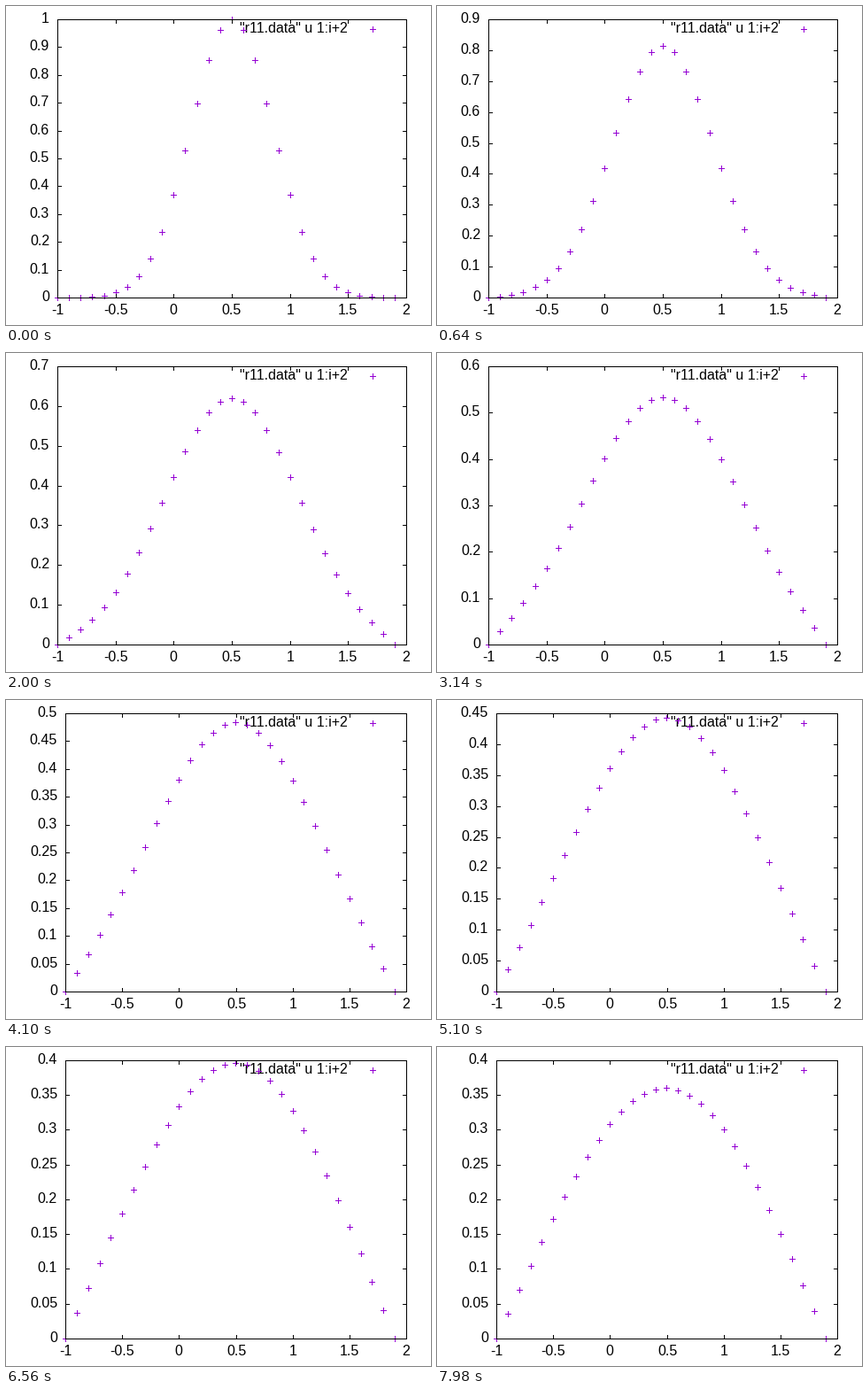
A matplotlib script for the animation above (8000 ms loop, 480 by 360 pixels).

```python
import math

import numpy as np
import matplotlib.pyplot as plt
from matplotlib.animation import FuncAnimation
from matplotlib.collections import PolyCollection

W, H, DPI = 480, 360, 100
FRAMES, INTERVAL = 400, 20
TOP, BOTTOM, RIGHT = 15, 329, 452
X_MIN, X_MAX = -1, 2
R = 0.1          # diffusion number of the explicit scheme
ARM, TICK = 3, 4
PURPLE = "#9400d3"

plt.rcParams["font.family"] = "Liberation Sans"
FONT_SIZE = 16 * 72 / DPI

x = np.linspace(-1, 1.9, 30)


def diffuse():
    """Heat equation with fixed ends, one row per time step."""
    u = np.exp(-4 * (x - 0.5) ** 2)
    rows = [u]
    for _ in range(FRAMES - 1):
        u = u.copy()
        u[1:-1] += R * (u[2:] - 2 * u[1:-1] + u[:-2])
        rows.append(u)
    return rows


history = diffuse()

fig = plt.figure(figsize=(W / DPI, H / DPI), dpi=DPI, facecolor="white")
ax = fig.add_axes([0, 0, 1, 1])
ax.set_xlim(0, W)
ax.set_ylim(H, 0)
ax.axis("off")


def box(x0, y0, x1, y1):
    """Filled rectangle covering pixels x0..x1 and y0..y1 inclusive."""
    return [(x0, y0), (x1 + 1, y0), (x1 + 1, y1 + 1), (x0, y1 + 1)]


def plus(cx, cy):
    return [box(cx - ARM, cy, cx + ARM, cy), box(cx, cy - ARM, cx, cy + ARM)]


def boxes(color, zorder):
    shapes = PolyCollection([], facecolors=color, edgecolors="none",
                            antialiaseds=False, zorder=zorder)
    shapes.set_snap(False)
    ax.add_collection(shapes, autolim=False)
    return shapes


def label(px, py, text, ha):
    return ax.text(px, py, text, ha=ha, va="baseline", color="black",
                   fontsize=FONT_SIZE, zorder=2)


points = boxes(PURPLE, 3)
border = boxes("black", 4)
label(386, 30, '"r11.data" u 1:i+2', "right")
x_ticks = np.arange(X_MIN, X_MAX + 0.1, 0.5)
x_labels = [label(0, 348, f"{v:g}", "center") for v in x_ticks]
y_labels = [label(0, 0, "", "right") for _ in range(11)]


def draw(i):
    u = history[i]
    peak = u.max()
    step = 0.1 if peak >= 0.5 else 0.05
    count = math.ceil(peak / step - 1e-9)
    left = 58 if step == 0.1 else 67

    def col(v):
        return left + math.floor((v - X_MIN) / (X_MAX - X_MIN) * (RIGHT - left) + 0.5)

    def row(v):
        return BOTTOM - math.floor(v / (count * step) * (BOTTOM - TOP) + 0.5)

    marks = plus(414, 26)
    for xv, yv in zip(x, u):
        marks += plus(col(xv), row(yv))
    points.set_verts(marks)

    lines = [box(left, TOP, RIGHT, TOP), box(left, BOTTOM, RIGHT, BOTTOM),
             box(left, TOP, left, BOTTOM), box(RIGHT, TOP, RIGHT, BOTTOM)]
    for v, text in zip(x_ticks, x_labels):
        c = col(v)
        lines += [box(c, TOP, c, TOP + TICK), box(c, BOTTOM - TICK, c, BOTTOM)]
        text.set_x(c)
    for k, text in enumerate(y_labels):
        text.set_visible(k <= count)
        if k <= count:
            r = row(k * step)
            lines += [box(left, r, left + TICK, r), box(RIGHT - TICK, r, RIGHT, r)]
            text.set_position((left - 9, r + 4))
            text.set_text(f"{k * step:g}")
    border.set_verts(lines)
    return [points, border, *x_labels, *y_labels]


anim = FuncAnimation(fig, draw, frames=FRAMES, interval=INTERVAL,
                     init_func=lambda: draw(0), repeat=True, repeat_delay=0)
plt.show()
```
